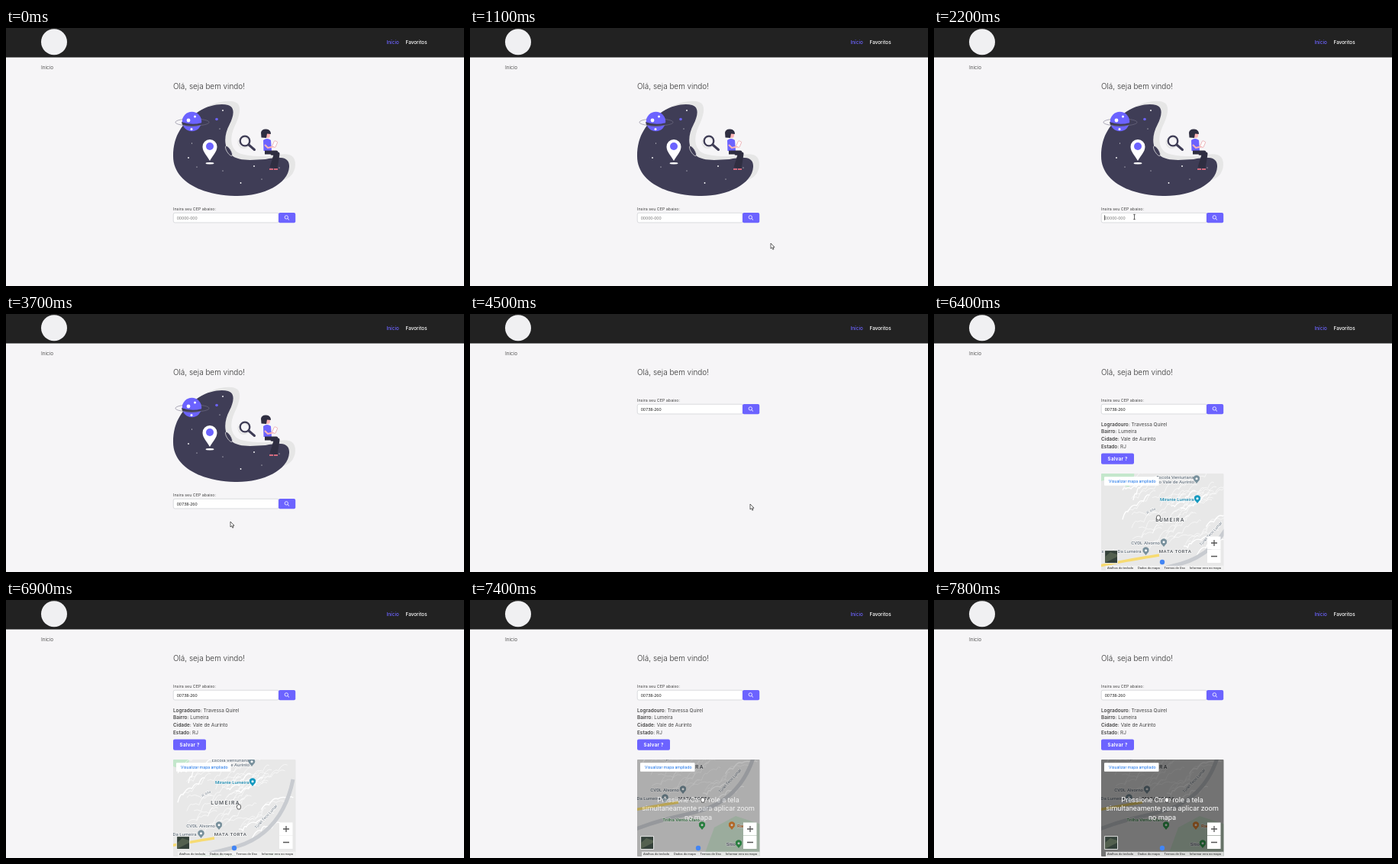
An HTML page that plays this animation: 600 by 338 pixels, repeating every 8 s.

```html
<!DOCTYPE html>
<html lang="pt-BR">
<head>
<meta charset="utf-8">
<title>Busca de CEP</title>
<style>
  html, body { margin: 0; width: 100%; height: 100%; overflow: hidden; background: #f6f5f7; }
  svg { display: block; width: 600px; height: 338px; font: 6.4px Inter, sans-serif; }
  .b { font-weight: 600; }
  .c { text-anchor: middle; }
  .e { text-anchor: end; }
  #map, #controls, #overlay { font-family: Roboto, sans-serif; }
  #places { font-size: 6.1px; font-weight: 500; fill: #65717d; stroke: #fff; stroke-width: 1.2px; paint-order: stroke; }
  #places .area { font-size: 7px; font-weight: 700; letter-spacing: 1.3px; fill: #5f6368; }
  #places .small { font-size: 4.4px; font-weight: 400; }
  #legal { font-size: 4.1px; fill: #222; }
  #stars { fill: #fff; }
</style>
</head>
<body>
<svg viewBox="0 0 600 338">
  <defs>
    <clipPath id="frame"><rect x="219" y="209" width="160.5" height="127" rx="1"/></clipPath>
  </defs>
  <rect width="600" height="38.5" fill="#222"/>
  <circle cx="63" cy="18.3" r="17" fill="#f0f0f2"/>
  <text x="498.5" y="21.3" font-weight="500" fill="#6c63ff">Início</text>
  <text x="523.5" y="21.3" font-weight="500" fill="#fff">Favoritos</text>
  <text x="46" y="54" fill="#555">Inicio</text>
  <text x="219" y="80" font-size="9.95" font-weight="300" fill="#333">Olá, seja bem vindo!</text>

  <g id="art">
    <path fill="#e6e6e6" d="M258 106C272 97 294 93 302 98C310 103 305 118 299 130C292 146 295 161 308 165C322 169 337 168 350 168C366 163 380 164 379 180C378 191 371 198 360 200L290 175Z"/>
    <path fill="#3f3d56" d="M219 168C219 140 232 124 250 111C262 102 280 98 291 101C301 104 298 116 293 126C285 141 285 156 295 166C304 175 322 173 340 172C358 168 372 168 371 182C370 205 335 221 300 220C255 219 219 200 219 168Z"/>
    <ellipse cx="292" cy="161" rx="2.6" ry="7.5" transform="rotate(-32 292 161)" fill="#3f3d56" stroke="#e6e6e6" stroke-width=".7"/>
    <g id="stars"></g>
    <circle cx="243.5" cy="122.5" r="12.7" fill="#6c63ff"/>
    <path d="M230 123Q243 128 257 124L256 127Q243 131 231 127Z" fill="#3f3d56"/>
    <ellipse cx="244" cy="123.5" rx="22" ry="4.7" fill="none" stroke="#77758c" stroke-width=".6"/>
    <path d="M232 118Q243 114 255 118L256 123.5Q244 126 231 123Z" fill="#6c63ff"/>
    <g fill="#fff"><circle cx="239" cy="121" r="2.4"/><circle cx="247.5" cy="116" r="1.5"/><circle cx="243" cy="132.5" r="1.5"/></g>
    <circle cx="276" cy="119.5" r="1.8" fill="#6c63ff"/>
    <path d="M267 174C263 167 257.500 162 257.500 155.500A9.500 9.500 0 0 1 276.500 155.500C276.500 162 271 167 267 174Z" fill="#fff"/>
    <circle cx="267" cy="155" r="5" fill="#6c63ff"/>
    <ellipse cx="267" cy="177.200" rx="5.500" ry="1.200" fill="#fff"/>
    <circle cx="311.500" cy="150" r="7" fill="none" stroke="#e6e6e6" stroke-width="2"/>
    <circle cx="313" cy="148" r="6.300" fill="none" stroke="#3f3d56" stroke-width="2.300"/>
    <path d="M318 153L325.500 159.500" stroke="#3f3d56" stroke-width="3" stroke-linecap="round"/>
    <circle cx="342.500" cy="140.500" r="3.600" fill="#ffb6b6"/>
    <path d="M334 137Q335 132 341 132.500Q347 133 347 139L342 138.500L341 144L334.500 143.500Z" fill="#2f2e41"/>
    <path d="M337 147Q342 143 347 147L348 161H337.500Z" fill="#6c63ff"/>
    <path d="M339 153L343 157L352 155" fill="none" stroke="#ffb6b6" stroke-width="2"/>
    <rect x="350" y="148" width="4.500" height="8" rx=".7" transform="rotate(24 352 152)" fill="#fff" stroke="#e8a2a8" stroke-width=".7"/>
    <path d="M339 163H354L348 183M347 164L356 165L353 184" fill="none" stroke="#2f2e41" stroke-width="5" stroke-linejoin="round"/>
    <path d="M345 185H350M351 185H356" stroke="#d36a7d" stroke-width="2"/>
  </g>

  <g id="form">
    <text x="219" y="238.500" font-size="5.350" fill="#444">Insira seu CEP abaixo:</text>
    <rect x="219.250" y="242.250" width="138" height="12.700" rx="2" fill="#fff" stroke="#c5c8cc" stroke-width=".6"/>
    <rect x="357" y="242" width="22.200" height="13.200" rx="2" fill="#6c63ff"/>
    <circle cx="367.300" cy="247.900" r="2.200" fill="none" stroke="#fff" stroke-width=".8"/>
    <path d="M369 249.600L371 251.500" stroke="#fff" stroke-width=".9"/>
    <text id="cep" x="223.700" y="250.600" font-family="Noto Sans, sans-serif" font-size="5.500"></text>
    <path id="caret" d="M0 245.300V251.800" stroke="#111" stroke-width=".7"/>
  </g>

  <g id="result" fill="#444">
    <text x="219" y="146.500"><tspan class="b">Logradouro:</tspan> Travessa Quirel</text>
    <text x="219" y="156.300"><tspan class="b">Bairro:</tspan> Lumeira</text>
    <text x="219" y="166"><tspan class="b">Cidade:</tspan> Vale de Aurinto</text>
    <text x="219" y="175.800"><tspan class="b">Estado:</tspan> RJ</text>
    <rect x="219" y="182.500" width="43" height="14.300" rx="2" fill="#6c63ff"/>
    <text x="240.700" y="191.700" class="c" font-size="6" font-weight="700" letter-spacing=".35" fill="#fff">Salvar ?</text>
  </g>

  <g id="map" clip-path="url(#frame)">
    <rect x="219" y="209" width="161" height="127" fill="#e8e8e8"/>
    <g id="tiles">
      <path d="M100 190H241L240 211L233 223L222 219L205 213L183 218L160 226H100Z" fill="#c4e7cc"/>
      <path d="M320 345L348 330L385 342V400H300Z" fill="#cfe6d2"/>
      <g id="streets" fill="none" stroke="#fff"></g>
      <path d="M376 235C368 275 350 300 322 315S270 326 215 348" fill="none" stroke="#c8cbd0" stroke-width="5"/>
      <path d="M150 333C190 328 220 320 273 312" fill="none" stroke="#f7db72" stroke-width="3.500"/>
      <g id="places">
        <text class="area c" x="287.500" y="267.500">LUMEIRA</text>
        <text class="area c" x="294" y="308.500" style="font-size:6.200px;letter-spacing:.5px">MATA TORTA</text>
        <text class="c" x="294" y="211.500">Escola Venturiana</text>
        <text class="c" x="294" y="217.700">do Vale de Aurinto</text>
        <text class="e" x="318.500" y="241" fill="#1583a8">Mirante Lumeira</text>
        <text class="e" x="274" y="298">CVDL Alvorno</text>
        <text class="e" x="249.500" y="309">Passarela Da Lumeira</text>
        <text class="small c" x="294" y="201" transform="rotate(-12 294 201)">R. Alta</text>
        <text class="small c" x="263" y="255" transform="rotate(-28 263 255)">R. Alta</text>
        <text class="small c" x="342" y="285" transform="rotate(-47 342 285)" style="font-size:5.200px">Túnel Teco Lumar</text>
        <text class="e" x="301" y="337" fill="#3c8a4c">Trilha Vento Claro</text>
        <text x="350" y="345" fill="#c26b21">Rancho</text>
        <text class="e" x="348" y="369">Sítio</text>
        <text class="e early" x="199" y="319" fill="#1583a8">Ponte Maior Sul</text>
        <text class="e early" x="234" y="327" fill="#1583a8">Praça Conde</text>
      </g>
      <g id="pins"></g>
    </g>
  </g>

  <rect id="blank" x="223" y="309" width="18" height="18" fill="#ccc" stroke="#f5f5f5" opacity=".8"/>
  <g id="overlay">
    <rect x="219" y="209" width="160.500" height="127" rx="1" fill="#000" opacity=".5"/>
    <g class="c" font-size="9.260" fill="#fff">
      <text x="299" y="264.700">Pressione Ctrl e role a tela</text>
      <text x="299" y="276.200">simultaneamente para aplicar zoom</text>
      <text x="299" y="287.700">no mapa</text>
    </g>
  </g>
  <g id="controls">
    <rect x="223" y="213.300" width="71.500" height="11.500" rx=".8" fill="#fff"/>
    <text x="229" y="221" font-size="5.350" fill="#1a73e8">Visualizar mapa ampliado</text>
    <rect x="223.700" y="309.700" width="16.800" height="16.800" fill="#34413a" stroke="#fff" stroke-width=".8"/>
    <path d="M224 318L231 312L240 315V318L232 322L224 326Z" fill="#53604f"/>
    <path d="M358 291.500h17.500v17h-17.500zm0 17.500h17.500v17h-17.500z" fill="#fff"/>
    <path d="M363 300h8m-4-4v8m-4 13.500h8" stroke="#555" stroke-width="1.300"/>
    <circle cx="299" cy="325" r="3.200" fill="#4285f4"/>
    <rect x="225" y="329.800" width="154.500" height="6.200" fill="#f5f5f5" opacity=".8"/>
    <g id="legal">
      <text x="227" y="334.400">Atalhos do teclado</text><text x="267" y="334.400">Dados do mapa</text>
      <text x="301.500" y="334.400">Termos de Uso</text><text x="335" y="334.400">Informar erro no mapa</text>
    </g>
  </g>

  <g id="cursor" fill="#fff" stroke="#222" stroke-width=".7" stroke-linejoin="round">
    <path id="arrow" d="M0 0V7L1.600 5.600L2.800 8.200L4 7.600L2.900 5.200H5Z"/>
    <path id="beam" d="M-1.300 -3.200H1.300M0 -3.200V3.200M-1.300 3.200H1.300"/>
    <path id="hand" d="M-2 -2.500Q0 -4 2 -2.500L2.600 0L1.800 3H-1.500L-2.700 .2Z"/>
  </g>
</svg>
<script>
const LOOP = 8000, STEP = 100, CEP = '00738-260';
const $ = id => document.getElementById(id);
const show = (el, on) => el.style.display = on ? '' : 'none';
const move = (el, x, y) => el.setAttribute('transform', `translate(${x} ${y})`);

// rows of [time, x, y]
const cursorPath = [
  [700, 590, 300], [1300, 296, 273], [1500, 296, 273], [2000, 262, 246.5], [2200, 262.5, 247.5],
  [3100, 262.5, 247.5], [3500, 294, 272], [3700, 294, 272], [4200, 367, 249], [4500, 367, 249],
  [5000, 369, 258], [5700, 369, 258], [5900, 350, 318], [6100, 305, 260], [6200, 305, 260],
  [6400, 294, 267], [6900, 305, 271], [7200, 305, 262]
];
const mapPath = [[6200, 57, 11], [6400, 22, 4], [6800, 0, 0], [6900, 0, 0], [7200, 0, -47]];

function at(path, t) {
  const i = path.findIndex(k => k[0] > t);
  if (i === 0) return path[0].slice(1);
  if (i < 0) return path[path.length - 1].slice(1);
  const [a, b] = [path[i - 1], path[i]];
  const p = (t - a[0]) / (b[0] - a[0]);
  return [1, 2].map(k => a[k] + (b[k] - a[k]) * p);
}

let seed = 11;
const random = () => (seed = seed * 16807 % 2147483647) / 2147483647;

function buildScene() {
  const stars = [[284, 108], [243.5, 151], [280, 132], [239, 170], [250, 182], [284, 187],
    [307.5, 203], [335, 198], [358, 183], [325, 181]];
  $('stars').innerHTML = stars.map(([x, y], i) =>
    `<circle cx="${x}" cy="${y}" r="${i % 3 ? .6 : .9}"/>`).join('');

  const pins = [[322, 212, '#78909c'], [323, 238, '#1599bf'], [279, 295, '#78909c'], [255.5, 306, '#78909c'],
    [304, 342, '#34a853'], [343, 342, '#ee8b32'], [352, 366, '#34a853']];
  $('pins').innerHTML = pins.map(([x, y, color]) =>
    `<path d="M${x} ${y + 6}L${x - 3.7} ${y + 1.5}A4.2 4.2 0 1 1 ${x + 3.7} ${y + 1.5}Z" fill="${color}"/>
     <circle cx="${x}" cy="${y - .3}" r="1.5" fill="#fff"/>`).join('');

  let streets = '';
  for (let i = 0; i < 46; i++) {
    let x = 225 + random() * 115, y = 225 + random() * 90, d = `M${x} ${y}`;
    for (let j = 0; j < 4; j++) {
      const dx = 4 + random() * 9, dy = -dx * .6 + (random() - .5) * 13;
      d += `q${dx / 2} ${dy - 3} ${dx} ${dy}`;
    }
    streets += `<path d="${d}" stroke-width="${i % 6 ? .6 : 1.3}"/>`;
  }
  $('streets').innerHTML = streets;
}

function draw(t) {
  const found = t >= 4500, loaded = t >= 5500;
  show($('art'), !found);
  move($('form'), 0, found ? -124 : 0);
  show($('result'), t >= 4600);
  show($('map'), t >= 4700);
  show($('tiles'), t >= 4900);
  show($('blank'), t >= 4900 && !loaded);
  show($('controls'), loaded);
  document.querySelectorAll('.early').forEach(el => show(el, !loaded));
  move($('tiles'), ...at(mapPath, t));
  $('overlay').style.opacity = Math.min(1, Math.max(0, (t - 7100) / 600));

  const typed = t < 2900 ? 0 : Math.min(CEP.length, 1 + Math.floor((t - 2900) / STEP * 1.6));
  $('cep').textContent = typed ? CEP.slice(0, typed) : '00000-000';
  $('cep').setAttribute('fill', typed ? '#222' : '#777');
  show($('caret'), t >= 2000 && t < 2500 || t >= 2900 && t < 3500);
  move($('caret'), 223.6 + 3 * typed, 0);

  const [x, y] = at(cursorPath, t);
  const beam = !found && y > 242 && y < 255 && x < 357;
  const hand = loaded || !found && x > 357 && y < 255;
  show($('cursor'), t >= 700);
  move($('cursor'), x, y);
  show($('beam'), beam);
  show($('hand'), hand);
  show($('arrow'), !beam && !hand);
}

function tick(now) {
  draw(Math.floor(now % LOOP / STEP) * STEP);
  requestAnimationFrame(tick);
}

buildScene();
draw(0);
requestAnimationFrame(tick);
</script>
</body>
</html>
```
